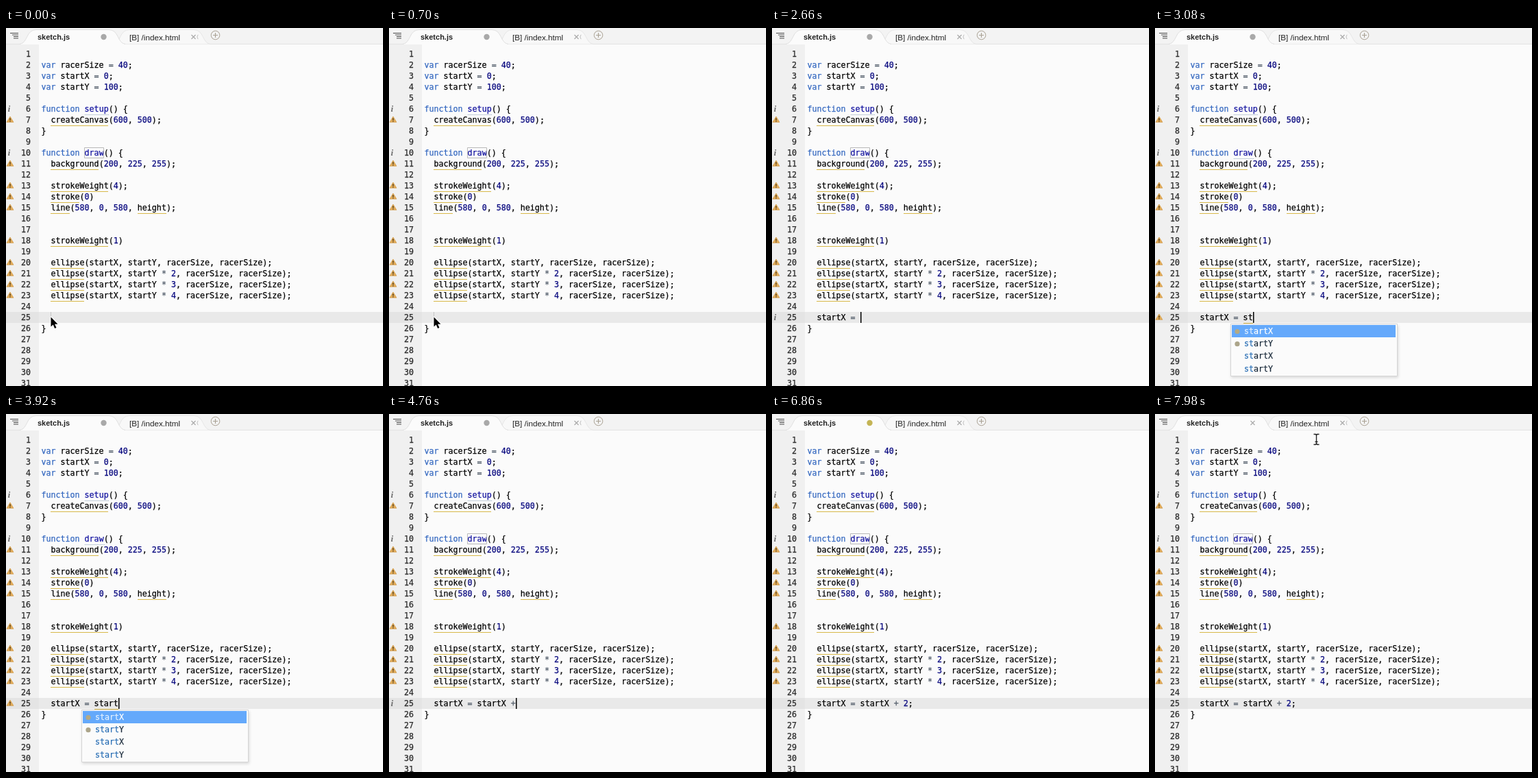
An HTML page with a canvas for the animation above (8000 ms loop, 550 by 522 pixels).

```html
<!DOCTYPE html>
<html lang="en">
<head>
<meta charset="utf-8">
<title>Code editor</title>
<style>
html, body { margin: 0; width: 100%; height: 100%; overflow: hidden; background: #fbfbfb; }
canvas { display: block; width: 550px; height: 522px; }
</style>
</head>
<body>
<canvas id="stage" width="550" height="522"></canvas>
<script>
const ctx = document.getElementById('stage').getContext('2d');
const LOOP = 8000, TICK = 140;
const CHAR = 7.02, LEFT = 51.4, ACTIVE = 25;
const MONO = '11.66px "DejaVu Sans Mono", monospace';
const SANS = '"Liberation Sans", sans-serif';

const source = `
var racerSize = 40;
var startX = 0;
var startY = 100;

function setup() {
  createCanvas(600, 500);
}

function draw() {
  background(200, 225, 255);

  strokeWeight(4);
  stroke(0)
  line(580, 0, 580, height);


  strokeWeight(1)

  ellipse(startX, startY, racerSize, racerSize);
  ellipse(startX, startY * 2, racerSize, racerSize);
  ellipse(startX, startY * 3, racerSize, racerSize);
  ellipse(startX, startY * 4, racerSize, racerSize);


}`.split('\n');

// [time, text on the active line]
const keys = [
  [0, ''], [980, 's'], [1120, 'st'], [1260, 'sta'], [1400, 'start'],
  [1820, 'startX'], [2100, 'startX '], [2380, 'startX ='], [2520, 'startX = '],
  [2940, 'startX = s'], [3080, 'startX = st'], [3220, 'startX = sta'],
  [3360, 'startX = start'], [4060, 'startX = startX'], [4340, 'startX = startX '],
  [4760, 'startX = startX +'], [5040, 'startX = startX + '],
  [5460, 'startX = startX + 2'], [6020, 'startX = startX + 2;']
];
const SAVING = 6580, SAVED = 7280, POINTER = 7560;

const lineY = n => 38 + 16 * (n - 1);
const colX = c => LEFT + c * CHAR;

function text(str, x, y, color, font, align = 'left') {
  ctx.font = font;
  ctx.fillStyle = color;
  ctx.textAlign = align;
  ctx.fillText(str, x, y);
}

// Slightly thickened monospace text
function mono(str, x, y, color, align) {
  text(str, x, y, color, MONO, align);
  ctx.strokeStyle = color;
  ctx.lineWidth = 0.25;
  ctx.strokeText(str, x, y);
}

function rect(x, y, w, h, color) {
  ctx.fillStyle = color;
  ctx.fillRect(x, y, w, h);
}

function dot(x, y, r, color) {
  ctx.fillStyle = color;
  ctx.beginPath();
  ctx.arc(x, y, r, 0, 7);
  ctx.fill();
}

function arc(x, y, r, from, to, color) {
  ctx.strokeStyle = color;
  ctx.lineWidth = 1;
  ctx.beginPath();
  ctx.arc(x, y, r, from, to);
  ctx.stroke();
}

function strokes(color, width, ...lines) {
  ctx.strokeStyle = color;
  ctx.lineWidth = width;
  ctx.beginPath();
  for (const [x, y, ...rest] of lines) {
    ctx.moveTo(x, y);
    for (let i = 0; i < rest.length; i += 2) ctx.lineTo(rest[i], rest[i + 1]);
  }
  ctx.stroke();
}

function cross(x, y, color) {
  strokes(color, 1.2, [x - 3, y - 3, x + 3, y + 3], [x + 3, y - 3, x - 3, y + 3]);
}

function tab(left, right, fill, edge) {
  ctx.beginPath();
  ctx.moveTo(left, 23.5);
  ctx.bezierCurveTo(left + 12, 22, left + 9, 2.5, left + 24, 2.5);
  ctx.lineTo(right - 24, 2.5);
  ctx.bezierCurveTo(right - 9, 2.5, right - 12, 22, right, 23.5);
  ctx.fillStyle = fill;
  ctx.fill();
  ctx.strokeStyle = edge;
  ctx.lineWidth = 1;
  ctx.stroke();
}

function drawTabs(t) {
  rect(0, 0, 550, 24, '#f3f3f3');
  rect(0, 23, 550, 1, '#e2e2e2');
  tab(156, 298, '#f8f8f8', '#e6e6e6');
  tab(20, 174, '#fbfbfb', '#e0e0e0');
  rect(22, 23, 150, 1, '#fbfbfb');

  strokes('#4c4c4c', 1.2, [6, 7.5, 18, 7.5], [9, 10, 18, 10], [11, 12.5, 18, 12.5], [11, 15, 18, 15]);

  text('sketch.js', 46, 17, '#222', 'bold 11px ' + SANS);
  text('[B] /index.html', 180, 18, '#222', '11.7px ' + SANS);
  if (t < SAVED) dot(142.5, 13, 4.2, t < SAVING ? '#a9a9a9' : '#c4b455');
  else cross(142.5, 13, '#aaa');
  cross(273.5, 13, '#aaa');
  arc(284, 13, 5, Math.PI - 0.7, Math.PI + 0.7, '#c0c0c0');

  arc(305.5, 10.5, 6.3, 0, 7, '#aaa294');
  strokes('#aaa294', 1.2, [302, 10.5, 309, 10.5], [305.5, 7, 305.5, 14]);
}

function tokenColor(token, before) {
  if (/^(var|function)$/.test(token)) return '#3468c0';
  if (/function $/.test(before)) return '#1414a0';
  if (/^\d/.test(token)) return '#0b0b80';
  if (/^[=*+]$/.test(token)) return '#555f6c';
  return '#000';
}

function drawCode(line, n) {
  for (const m of line.matchAll(/\w+|[^\w\s]/g)) {
    const before = line.slice(0, m.index);
    mono(m[0], colX(m.index), lineY(n) + 4, tokenColor(m[0], before));
  }
}

function underline(col, len, n) {
  rect(Math.round(colX(col)), lineY(n) + 8, Math.round(len * CHAR), 1, '#d8b94a');
}

function dotted(col, len, n) {
  const x = Math.round(colX(col));
  for (let i = 0; i < len * CHAR; i += 2) rect(x + i, lineY(n) + 8, 1, 1, '#8fa6bd');
}

function warn(n) {
  const y = lineY(n);
  ctx.beginPath();
  ctx.moveTo(6, y - 5);
  ctx.lineTo(11, y + 3.3);
  ctx.lineTo(1, y + 3.3);
  ctx.closePath();
  ctx.fillStyle = '#e2ac58';
  ctx.fill();
  ctx.strokeStyle = '#d3a052';
  ctx.lineWidth = 0.8;
  ctx.lineJoin = 'round';
  ctx.stroke();
  rect(5.3, y - 2.5, 1.4, 3, '#4a3516');
  rect(5.3, y + 1.4, 1.4, 1.2, '#4a3516');
}

function info(n) {
  text('i', 2.8, lineY(n) + 4, '#6a6a6a', 'italic bold 12.5px "Liberation Serif", serif');
}

function drawSource(popup) {
  source.forEach((line, i) => {
    const n = i + 1;
    drawCode(line, n);
    const call = line.match(/^  (\w+)\(/);
    if (call) {
      underline(2, call[1].length, n);
      warn(n);
    }
    if (line.startsWith('function')) info(n);
  });
  underline(20, 6, 15);
  dotted(9, 5, 6);
  if (popup) {
    dotted(9, 4, 10);
  } else {
    ctx.strokeStyle = '#b9b9b9';
    ctx.lineWidth = 1;
    ctx.strokeRect(114.5, 174.5, 28, 15);
  }
}

function drawPopup(x, count, typed) {
  const h = count * 18 + 4;
  ctx.save();
  ctx.shadowColor = 'rgba(0,0,0,.14)';
  ctx.shadowBlur = 4;
  ctx.shadowOffsetX = 1;
  ctx.shadowOffsetY = 2;
  rect(x, 432, 244, h, '#fbfbfb');
  ctx.restore();
  ctx.strokeStyle = '#d4d4d4';
  ctx.lineWidth = 1;
  ctx.strokeRect(x + 0.5, 431.5, 243, h);
  rect(x + 2, 433, 239, 18, '#64a9fb');

  for (let i = 0; i < count; i++) {
    const y = 442 + 18.2 * i;
    const name = 'start' + 'XY'[i % 2];
    if (i < 2) dot(x + 10, y + 0.5, 3.6, i ? '#aca58a' : '#b5aa83');
    mono(typed, x + 20, y + 4, i ? '#2a6fb5' : '#e2f0ff');
    mono(name.slice(typed.length), x + 20 + typed.length * CHAR, y + 4, i ? '#1c2c3c' : '#fff');
  }
}

function drawArrow(x, y) {
  const shape = [0, 0, 0, 14, 3.2, 11, 5.6, 16.6, 8, 15.6, 5.6, 10.3, 10, 10.3];
  ctx.beginPath();
  for (let i = 0; i < shape.length; i += 2) ctx.lineTo(x + shape[i], y + shape[i + 1]);
  ctx.closePath();
  ctx.strokeStyle = '#fff';
  ctx.lineWidth = 2;
  ctx.stroke();
  ctx.fillStyle = '#000';
  ctx.fill();
}

function drawBeam(x, y) {
  const parts = [
    [x - 4, y - 7.5, x - 1, y - 7.5, x, y - 6, x, y + 6, x - 1, y + 7.5, x - 4, y + 7.5],
    [x + 4, y - 7.5, x + 1, y - 7.5, x, y - 6],
    [x, y + 6, x + 1, y + 7.5, x + 4, y + 7.5],
    [x - 2, y + 3.5, x + 2, y + 3.5]
  ];
  strokes('#fff', 3, ...parts);
  strokes('#222', 1.4, ...parts);
}

function draw(time) {
  const t = Math.floor((time % LOOP) / TICK) * TICK;
  const [since, typed] = keys.filter(k => k[0] <= t).pop();
  const word = typed.match(/s[tar]*$/);
  const popup = word && word[0];

  rect(0, 0, 550, 522, '#fbfbfb');
  rect(0, 24, 48, 498, '#f0f0f0');
  rect(0, 414, 550, 16, '#e9e9e9');
  rect(0, 414, 48, 16, '#e4e4e4');
  drawTabs(t);

  for (let n = 1; n <= 31; n++) mono(n, 36, lineY(n) + 4, '#2c2c2c', 'right');
  drawSource(popup);
  drawCode('  ' + typed, ACTIVE);
  if (popup) {
    warn(ACTIVE);
    underline(2 + word.index, popup.length, ACTIVE);
  } else if (typed && !typed.endsWith(';')) {
    info(ACTIVE);
  }

  const caretX = Math.round(colX(2 + typed.length) - 0.1);
  if (!typed) rect(caretX, 414, 1, 16, '#c6c6c6');
  else if (popup || (t - since) % 1000 < 500) rect(caretX, 414, 1.5, 16, '#000');

  if (popup) drawPopup(Math.round(colX(2 + word.index) - 18.5), word.index ? 4 : 2, popup);

  if (!typed) drawArrow(65.5, 421.5);
  if (t >= POINTER) {
    const left = 1 - (t - POINTER) / 420;
    const ease = 1 - left * left;
    drawBeam(90 + 145.5 * ease, 400 - 363 * ease);
  }
}

const start = performance.now();
function loop() {
  draw(performance.now() - start);
  requestAnimationFrame(loop);
}
loop();
</script>
</body>
</html>
```
